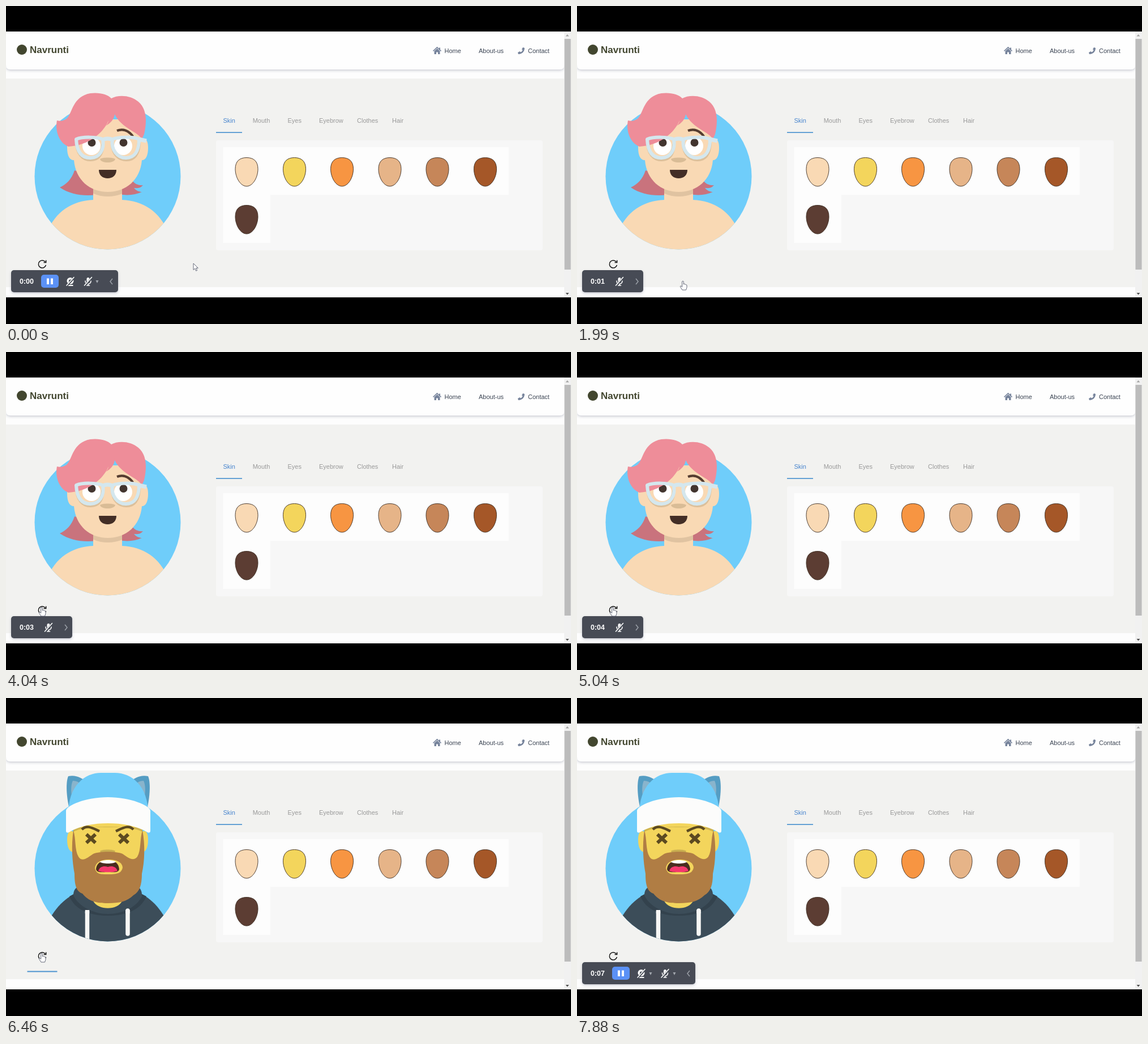
Recreate the animation shown at these times as an HTML page. Size 998 px wide and 561 px high, loop 7990 ms.

```html
<!DOCTYPE html>
<html lang="en">
<head>
<meta charset="utf-8">
<title>Avatar maker</title>
<style>
html, body { margin: 0; width: 100%; height: 100%; overflow: hidden; background: #000; }
svg { display: block; }
#stage { width: 100vw; height: 100vh; }
text { font: 11px "Liberation Sans", Arial, sans-serif; }
.nav text { fill: #3b4453; }
.tabs text { fill: #999; }
.tabs .on { fill: #4583cd; }
.time text { font-size: 12.5px; font-weight: bold; fill: #fff; }
.brand { font-size: 17px; font-weight: bold; fill: #42462f; }
.faces use { stroke: #3a2b20; stroke-width: .9; }

.step { animation: 7990ms step-end infinite; }
.girl { animation-name: girl; }
.cat { animation-name: cat; }
.first { animation-name: first; }
.small { animation-name: small; }
.last { animation-name: last; }
.clock { animation-name: bar; }
.time { animation-name: tick; }
.arrow { animation-name: arrow; }
.hand { animation-name: hand; }
.pointer { animation: move 7990ms ease-in-out infinite; }

@keyframes girl { 0% { opacity: 1 } 79.2%, 100% { opacity: 0 } }
@keyframes cat { 0% { opacity: 0 } 79.2%, 100% { opacity: 1 } }
@keyframes first { 0% { opacity: 1 } 20%, 100% { opacity: 0 } }
@keyframes small { 0% { opacity: 0 } 20% { opacity: 1 } 79.2%, 100% { opacity: 0 } }
@keyframes last { 0% { opacity: 0 } 85%, 100% { opacity: 1 } }
@keyframes bar { 0% { opacity: 1 } 79.2% { opacity: 0 } 85%, 100% { opacity: 1 } }
@keyframes tick {
  0% { transform: none }
  12.5% { transform: translateY(-20px) }
  28.8% { transform: translateY(-40px) }
  45% { transform: translateY(-60px) }
  61.3% { transform: translateY(-80px) }
  85% { transform: translateY(-100px) }
  92.6%, 100% { transform: translateY(-120px) }
}
@keyframes arrow { 0% { opacity: 1 } 14.5% { opacity: 0 } 30% { opacity: 1 } 37%, 100% { opacity: 0 } }
@keyframes hand { 0% { opacity: 0 } 14.5% { opacity: 1 } 30% { opacity: 0 } 37%, 100% { opacity: 1 } }
@keyframes move {
  0%, 4% { transform: translate(331px, 454px) }
  16%, 29% { transform: translate(187px, 485px) }
  39%, 42% { transform: translate(67px, 449px) }
  46%, 85% { transform: translate(63px, 450px) }
  91%, 100% { transform: translate(61px, 522px) }
}
</style>
</head>
<body>
<svg id="stage" viewBox="0 0 998 561">
  <defs>
    <filter id="soft" x="-10%" y="-30%" width="120%" height="170%">
      <feDropShadow dx="0" dy="2" stdDeviation="2" flood-color="#4a4f70" flood-opacity=".28"/>
    </filter>
    <clipPath id="disc"><circle cx="179.5" cy="300.5" r="129"/></clipPath>
    <clipPath id="neck"><path d="M154 300H205V350H154Z"/></clipPath>
    <path id="face" d="M-20 -5C-20 -19 -12 -25 0 -25S20 -19 20 -5C20 10 11 25.500 0 25.500S-20 10 -20 -5Z"/>
    <path id="head" d="M119 200V236C112 232 108 238 108 250C108 264 112 272 120 272C123 307 148 328 180 328S237 307 240 272C247 272 251 264 251 250C251 238 247 232 240 236V200Z"/>
    <path id="nose" d="M166 270C169 266.500 190 266.500 193 270C191 278 168 278 166 270Z"/>
    <path id="caret" d="M-2.500 -2H2.500L0 3Z" fill="#a3a8af"/>
    <g id="mic" fill="none" stroke="#fff" stroke-width="1.600" stroke-linecap="round">
      <rect x="-2.500" y="-7" width="5" height="9" rx="2.500" fill="#fff" stroke="none"/>
      <path d="M-5 -1C-5 6 5 6 5 -1M0 4.500V7M-2.500 7H2.500"/>
      <path d="M-6 7.500L7 -7" stroke="#464c55" stroke-width="3.500"/>
      <path d="M-6.500 7L6.500 -7.500"/>
    </g>
    <g id="cam">
      <circle cy="-1" r="6" fill="#fff"/>
      <circle cy="-1" r="2.600" fill="#464c55"/>
      <path d="M-5 7H5" stroke="#fff" stroke-width="2"/>
      <path d="M-6 7.500L7 -7" stroke="#464c55" stroke-width="3.500"/>
      <path d="M-6.500 7L6.500 -7.500" stroke="#fff" stroke-width="1.600" stroke-linecap="round"/>
    </g>
    <g id="pause">
      <rect x="62" y="474" width="31" height="23" rx="5" fill="#5b91f6"/>
      <path d="M72 480.500H76V491H72ZM79 480.500H83V491H79Z" fill="#fff"/>
    </g>
    <g id="catear">
      <path d="M111 192C106 168 106 147 110 138C122 135 135 140 143 150Z" fill="#559dc3"/>
      <path d="M117 178C114 164 115 152 118 146C126 146 131 150 135 155Z" fill="#89b4cc"/>
    </g>
    <path id="cross" d="M-8 -7.500L8 7.500M8 -7.500L-8 7.500"/>
  </defs>

  <!-- page -->
  <rect y="45" width="998" height="469" fill="#fdfdfd"/>
  <rect y="128" width="986" height="368" fill="#f2f2f0"/>
  <path d="M0 45H986V104Q986 112 978 112H8Q0 112 0 104Z" fill="#fefefe" filter="url(#soft)"/>
  <circle cx="28" cy="77" r="9" fill="#42462f"/>
  <text class="brand" x="42" y="83">Navrunti</text>
  <g class="nav">
    <path d="M754.500 79.500L761.500 73L768.500 79.500" fill="none" stroke="#77849c" stroke-width="1.700"/>
    <path d="M765 73.500H767V77H765ZM756.500 79.500L761.500 75L766.500 79.500V85H763V81.500H760V85H756.500Z" fill="#77849c"/>
    <path d="M913 73L916 74C916 81 911 85 905 85L904 82L907.500 80L909 81.500C911 80.500 912 79.500 912.500 77.500L911 76.500Z" fill="#77849c"/>
    <text x="774.500" y="83">Home</text>
    <text x="835" y="83">About-us</text>
    <text x="922" y="83">Contact</text>
  </g>

  <g class="tabs">
    <text class="on" x="383.500" y="206">Skin</text>
    <text x="435.700" y="206">Mouth</text>
    <text x="497.500" y="206">Eyes</text>
    <text x="553" y="206">Eyebrow</text>
    <text x="620" y="206">Clothes</text>
    <text x="682" y="206">Hair</text>
    <rect x="371" y="222.300" width="46" height="1.700" fill="#4d94d0"/>
  </g>
  <rect x="371" y="237" width="577" height="194" rx="4" fill="#f7f7f7"/>
  <path d="M383.500 249H888V333H467V418H383.500Z" fill="#fdfdfd"/>
  <g class="faces">
    <use href="#face" x="425" y="292.500" fill="#f9d9b4"/>
    <use href="#face" x="509.500" y="292.500" fill="#f3d55c"/>
    <use href="#face" x="593.500" y="292.500" fill="#f79542"/>
    <use href="#face" x="678" y="292.500" fill="#e6b488"/>
    <use href="#face" x="762" y="292.500" fill="#c68659"/>
    <use href="#face" x="846.500" y="292.500" fill="#a55728"/>
    <use href="#face" x="425" y="376.500" fill="#5c3d33"/>
  </g>

  <!-- avatars -->
  <circle cx="179.500" cy="300.500" r="129" fill="#6fcdfa"/>
  <g class="step girl">
    <path d="M121 290C116 306 106 315 95 320C114 333 138 336 160 333V300Z" fill="#c9737d"/>
    <path d="M222 307C228 315 236 317 242 316C238 321 232 322 226 321C230 326 236 328 240 328C229 333 215 335 200 332V310Z" fill="#c9737d"/>
    <g clip-path="url(#disc)">
      <path d="M72 400C88 362 116 344 154 342V310H205V342C243 344 271 362 287 400V435H72Z" fill="#f9d9b4"/>
    </g>
    <g clip-path="url(#neck)"><use href="#head" y="8" fill="#e0c3a1"/></g>
    <use href="#head" fill="#f9d9b4"/>
    <use href="#nose" fill="#d9bc96"/>
    <path d="M164 289H195C195 299 188 304 179.500 304S164 299 164 289Z" fill="#432e26"/>
    <g fill="none" stroke="#dcc09b" stroke-width="6">
      <path d="M125 241C126 260 135 271 149 271S170 261 171 244M188 244C189 261 199 271 213 271S234 260 235 241"/>
    </g>
    <circle cx="151" cy="247" r="16" fill="#fff"/>
    <circle cx="207" cy="247" r="16" fill="#fff"/>
    <circle cx="151.500" cy="241" r="7" fill="#42352f"/>
    <circle cx="207.500" cy="241" r="7" fill="#42352f"/>
    <path d="M196 220C207 216 217 220 224 230" fill="none" stroke="#553d30" stroke-width="4.500"/>
    <path d="M110 248C95 242 86 222 90 202C96 204 102 202 107 199C118 188 117 160 149 154C165 152 180 156 186 163C198 156 221 157 234 169C249 182 249 204 244 226L240 235C234 222 204 216 192 191C191 200 184 207 177 211C179 208 181 204 181 202C173 222 148 246 110 248Z" fill="#ee8d99"/>
    <g fill="none" stroke="#d4e7ee" stroke-width="6" stroke-linejoin="round">
      <path d="M124 235C136 230 160 231 171 235C174 254 165 268 149 268C133 268 125 256 124 235ZM235 235C224 230 199 231 188 235C185 254 197 268 212 268C227 268 235 256 235 235Z"/>
      <path d="M171 236Q179.500 232 188 236M235 235L248 238" stroke-width="7"/>
    </g>
  </g>

  <g class="step cat">
    <g clip-path="url(#disc)">
      <path d="M68 410C84 368 108 350 130 342H230C252 350 275 368 291 410V435H68Z" fill="#3c4d59"/>
      <path d="M112 350C122 374 148 384 180 384S238 374 248 350L225 338H134Z" fill="#33424d"/>
      <path d="M119 348C119 336 126 331 136 332H225C235 331 241 338 240 350C230 370 205 381 180 381S128 368 119 348Z" fill="#3c4d59"/>
      <path d="M143.500 376V432" stroke="#f7f7f5" stroke-width="7.500"/>
      <path d="M215 375V416" stroke="#f7f7f5" stroke-width="7.500" stroke-linecap="round"/>
      <path d="M215 374V380M143.500 374V380" stroke="#f7f7f5" stroke-width="7.500"/>
    </g>
    <path d="M154 345H205V358C198 375 162 375 154 358Z" fill="#f3d55c"/>
    <use href="#head" fill="#f3d55c"/>
    <path d="M119 236C140 224 220 224 241 236V228H119Z" fill="#cfb44e"/>
    <use href="#nose" fill="#c9ae50"/>
    <path d="M119 233C115 262 117 288 121 310C121 330 124 341 135 345C146 359 160 362 180 362S214 359 225 348C236 342 240 330 240 310C245 288 246 260 241 233C236 250 239 268 232 280C224 290 214 280 206 275C194 270 166 270 154 275C146 280 135 291 128 280C121 268 124 250 119 233Z" fill="#b07d44"/>
    <path d="M157 300C158 290 168 285 181 285S205 289 206 299C204 309 197 311 181 311S160 311 157 300Z" fill="#f3d55c"/>
    <path d="M159 302C160 291 168 286 180 287C192 286 199 291 200 302C198 309 192 307 180 307S161 309 159 302Z" fill="#4a2d20"/>
    <path d="M166 289C171 285 189 285 194 289C191 293 169 293 166 289Z" fill="#fff"/>
    <path d="M163 305C166 297 173 296 180 298C187 296 194 297 197 305C192 308 168 308 163 305Z" fill="#f5386d"/>
    <g fill="none" stroke="#5c4a20" stroke-width="6">
      <use href="#cross" x="150" y="248"/>
      <use href="#cross" x="208" y="248"/>
      <path d="M134 232C142 223 152 229 165 235M225 232C217 223 207 229 194 235" stroke-width="4.500"/>
    </g>
    <use href="#catear"/>
    <use href="#catear" transform="matrix(-1 0 0 1 361 0)"/>
    <path d="M110 204C110 155 139 132 168 132H192C222 132 251 155 251 204Z" fill="#6fcdfa"/>
    <path d="M106 199C106 190 140 175 180 175S255 190 255 199V234Q255 239 250 237C230 225 205 221 180 221S131 225 111 237Q106 239 106 234Z" fill="#fcfcfb"/>
  </g>

  <g fill="none" stroke="#151515" stroke-width="1.500">
    <path d="M69.500 451.500A6.700 6.700 0 1 0 70.500 457"/>
    <path d="M70.700 448.500V452.500H66.500"/>
  </g>
  <rect x="37.500" y="481.500" width="53" height="2" fill="#4d94d0"/>

  <!-- recorder bar -->
  <g class="step first">
    <rect x="9" y="466" width="189" height="39" rx="5" fill="#464c55" filter="url(#soft)"/>
    <use href="#pause"/>
    <use href="#cam" x="113.500" y="486"/>
    <use href="#mic" x="145" y="486"/>
    <use href="#caret" x="161" y="486"/>
    <path d="M188 481L184 486L188 491" fill="none" stroke="#9ba0a8" stroke-width="1.500"/>
  </g>
  <g class="step small">
    <rect x="9" y="466" width="108" height="39" rx="5" fill="#464c55" filter="url(#soft)"/>
    <use href="#mic" x="75" y="486"/>
    <path d="M104 481L108 486L104 491" fill="none" stroke="#9ba0a8" stroke-width="1.500"/>
  </g>
  <g class="step last">
    <rect x="9" y="466" width="200" height="39" rx="5" fill="#464c55" filter="url(#soft)"/>
    <use href="#pause"/>
    <use href="#cam" x="113.500" y="486"/>
    <use href="#caret" x="130" y="486"/>
    <use href="#mic" x="155.500" y="486"/>
    <use href="#caret" x="172" y="486"/>
    <path d="M199 481L195 486L199 491" fill="none" stroke="#9ba0a8" stroke-width="1.500"/>
  </g>
  <g class="step clock">
    <svg x="20" y="476" width="36" height="20" overflow="hidden">
      <g class="step time">
        <text x="4" y="14">0:00</text>
        <text x="4" y="34">0:01</text>
        <text x="4" y="54">0:02</text>
        <text x="4" y="74">0:03</text>
        <text x="4" y="94">0:04</text>
        <text x="4" y="114">0:06</text>
        <text x="4" y="134">0:07</text>
      </g>
    </svg>
  </g>

  <!-- scroll bar -->
  <rect x="986" y="45" width="12" height="469" fill="#f1f1f1"/>
  <rect x="986.500" y="58" width="11" height="407" fill="#bcbcbc"/>
  <path d="M988.500 53.500H994.500L991.500 50Z" fill="#a3a3a3"/>
  <path d="M988.500 506H994.500L991.500 509.500Z" fill="#505050"/>

  <g class="pointer" fill="#fff" stroke="#555a6b" stroke-width=".9" stroke-linejoin="round">
    <path class="step arrow" d="M0 0V11.500L2.700 9L4.600 13.300L6.600 12.400L4.700 8.300H8.300Z"/>
    <path class="step hand" d="M-1.300 1Q0 -.8 1.300 1V6L2 5.200Q3.500 5 3.700 6.200Q5 5.500 5.600 6.800Q7 6.500 7 8V11.500L5.500 16H-1L-4.500 10.500Q-5 8.500 -3.200 9L-1.300 10.500Z"/>
  </g>

  <path d="M0 0H998V45H0ZM0 514H998V561H0Z"/>
</svg>
</body>
</html>
```
